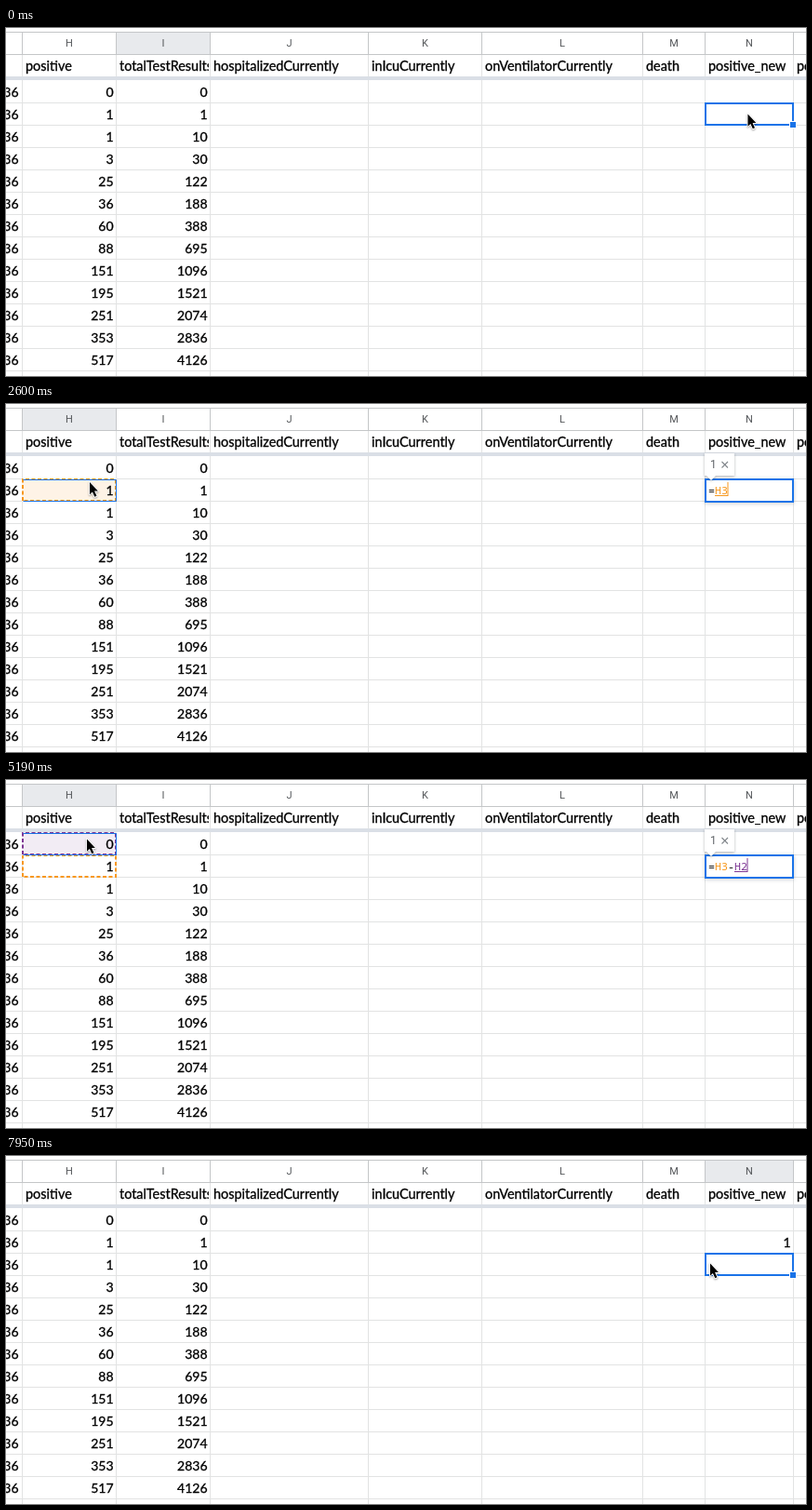
Recreate the animation shown at these times as an HTML page with a canvas. Size 860 px wide and 374 px high, loop 8000 ms.

```html
<!DOCTYPE html>
<html lang="en">
<head>
<meta charset="utf-8">
<title>Spreadsheet formula</title>
<style>
  html, body { margin: 0; width: 100%; height: 100%; overflow: hidden; background: #fff; }
  canvas { display: block; }
</style>
</head>
<body>
<canvas id="stage" width="860" height="374"></canvas>
<script>
const ctx = document.getElementById('stage').getContext('2d');
const W = 860, H = 374, LOOP = 8000, ROW = 24;
const BLUE = '#1a73e8', ORANGE = '#f7981d', PURPLE = '#7e3794', GRID = '#e2e3e3', RULE = '#c4c6c8';
const CELL_FONT = '14.45px Lato, sans-serif';
const DIGIT_FONT = '14px Lato, sans-serif';
const HEAD_FONT = '11px Roboto, sans-serif';
const CODE_FONT = '11.67px "Noto Sans Mono", monospace';
const CHAR = 7, CODE_X = 755;

const rowTop = row => 56 + ROW * (row - 2);

let nextLeft = 17;
const columns = [
  ['H', 'positive', 101], ['I', 'totalTestResults', 101], ['J', 'hospitalizedCurrently', 170],
  ['K', 'inIcuCurrently', 122], ['L', 'onVentilatorCurrently', 173], ['M', 'death', 67],
  ['N', 'positive_new', 95], ['O', 'positive_rate', 120]
].map(([letter, title, width]) => {
  const left = nextLeft;
  nextLeft += width;
  return { letter, title, width, left, right: nextLeft };
});
const [colH, colI] = columns, colN = columns[6];

const cells = {
  H: '0 1 1 3 25 36 60 88 151 195 251 353 517'.split(' '),
  I: '0 1 10 30 122 188 388 695 1096 1521 2074 2836 4126'.split(' ')
};

// Moments at which the formula changes.
const EDIT = 900, HINT = 1080, FIRST = 2600, MINUS = 3950, SECOND = 5190, ENTER = 6470;
const edits = [EDIT, HINT, FIRST, MINUS, SECOND];

// Each glide follows a quadratic curve through a bend, in visible steps.
const glides = [
  { start: 0, end: 1, steps: 1, from: [797, 92.5], bend: [797, 92.5], to: [797, 92.5] },
  { start: 1440, end: 1840, steps: 7, from: [799, 95], bend: [400, 32], to: [89.5, 79.5] },
  { start: 1890, end: 2070, steps: 3, from: [89.5, 81], bend: [89.5, 83], to: [89.5, 84] },
  { start: 4490, end: 4950, steps: 7, from: [89.5, 84], bend: [86, 75], to: [86.5, 63.5] },
  { start: 7310, end: 7530, steps: 4, from: [129.5, 71.5], bend: [370, 140], to: [585, 170] },
  { start: 7770, end: 7950, steps: 3, from: [601, 168], bend: [690, 142], to: [756.5, 115.5] }
];

function cursorAt(t) {
  const g = glides.filter(({ start }) => t >= start).pop();
  const step = Math.round((t - g.start) / (g.end - g.start) * g.steps);
  const p = Math.min(1, step / g.steps), q = 1 - p;
  return g.from.map((a, i) => q * q * a + 2 * q * p * g.bend[i] + p * p * g.to[i]);
}

// Typing hides the pointer until it moves again.
function cursorVisible(t) {
  const moved = glides.filter(({ start }) => t >= start).pop().start;
  return ![EDIT, MINUS].some(typed => t >= typed && moved < typed && t < ENTER);
}

function caretVisible(t) {
  const last = edits.filter(at => t >= at).pop();
  return (t - last) % 1110 < 630;
}

function rect(x, y, w, h, color) {
  ctx.fillStyle = color;
  ctx.fillRect(x, y, w, h);
}

function text(str, x, y, font, color = '#000', align = 'left') {
  ctx.font = font;
  ctx.fillStyle = color;
  ctx.textAlign = align;
  ctx.fillText(str, x, y);
}

// Cell text with slightly heavier strokes.
function cellText(str, x, y, font, align = 'left') {
  text(str, x, y, font, '#000', align);
  ctx.strokeStyle = '#000';
  ctx.lineWidth = 0.3;
  ctx.strokeText(str, x, y);
}

function digits(value, right, row) {
  cellText(value, right - 2.5, rowTop(row) + 18, DIGIT_FONT, 'right');
}

function line(points, color, width, dash = []) {
  ctx.beginPath();
  points.forEach(([x, y]) => ctx.lineTo(x, y));
  ctx.strokeStyle = color;
  ctx.lineWidth = width;
  ctx.setLineDash(dash);
  ctx.stroke();
  ctx.setLineDash([]);
}

function shadowed(color, blur, dy, draw) {
  ctx.save();
  ctx.shadowColor = color;
  ctx.shadowBlur = blur;
  ctx.shadowOffsetY = dy;
  draw();
  ctx.restore();
}

function drawSheet(active) {
  rect(0, 0, W, H, '#fff');
  rect(active.left + 1, 5, active.width - 1, 23, '#e8eaed');
  for (let y = rowTop(3); y < H; y += ROW) rect(0, y, W, 1, GRID);
  for (const { left, right, width, letter, title } of columns) {
    rect(left, 29, 1, H - 29, GRID);
    rect(left, 4, 1, 24, RULE);
    text(letter, (left + right + 1) / 2, 20, HEAD_FONT, '#54575a', 'center');
    ctx.save();
    ctx.beginPath();
    ctx.rect(left + 1, 29, width - 2, 23);
    ctx.clip();
    cellText(title, left + 4, 46, CELL_FONT);
    ctx.restore();
  }
  rect(0, 4, W, 1, RULE);
  rect(0, 28, W, 1, RULE);
  rect(0, 52, W, 4, '#dadfe6');
}

function drawNumbers() {
  cells.H.forEach((value, i) => {
    digits('36', colH.left - 1, i + 2);
    digits(value, colH.right, i + 2);
    digits(cells.I[i], colI.right, i + 2);
  });
}

function drawSelection(row) {
  const y = rowTop(row), { left, right } = colN;
  ctx.strokeStyle = BLUE;
  ctx.lineWidth = 2;
  ctx.strokeRect(left + 1, y + 1, right - left - 1, ROW - 1);
  rect(right - 4, y + 20, 8, 8, '#fff');
  rect(right - 3, y + 21, 6, 6, BLUE);
}

function drawReference(row, color, fill) {
  const left = colH.left + 1, right = colH.right, top = rowTop(row) + 1, bottom = top + ROW - 1;
  const box = [[left, bottom], [left, top], [right, top], [right, bottom], [left, bottom]];
  if (fill) rect(left - 1, top - 1, right - left + 2, bottom - top + 2, fill);
  line(box, color, 2, [4, 2.5]);
  if (fill) line(box.slice(1).map(([x, y]) => [x + 0.5, y + 0.5]), BLUE, 1);
}

function drawEditor(parts, caret, hint) {
  const { left, width } = colN, y = rowTop(3);
  shadowed('rgba(60,64,67,.25)', 4, 1, () => rect(left, y, width + 1, ROW + 2, BLUE));
  rect(left + 2, y + 2, width - 3, ROW - 2, '#fff');
  let x = CODE_X, color = '#000';
  for (const part of parts) {
    const width = part.str.length * CHAR;
    color = part.color || '#000';
    text(part.str, x, 97, CODE_FONT, color);
    if (part.active) rect(x, 98, width, 1, color);
    x += width;
  }
  if (hint) line([[x + 2.5, 95], [x + 2.5, 98.5], [x + 8.5, 98.5], [x + 8.5, 95]], '#c8c8c8', 1);
  if (caret) rect(x - 0.5, 84, 1, 15, color);
}

function drawPreview() {
  shadowed('rgba(60,64,67,.4)', 3, 1, () => {
    ctx.fillStyle = '#fff';
    ctx.beginPath();
    [[751, 53], [783, 53], [783, 77], [763, 77], [758, 82], [753, 77], [751, 77]]
      .forEach(([x, y]) => ctx.lineTo(x, y));
    ctx.fill();
  });
  text('1', 757, 69, '12px Roboto, sans-serif', '#5f6368');
  line([[769.5, 62], [776, 68.5]], '#80868b', 1.1);
  line([[776, 62], [769.5, 68.5]], '#80868b', 1.1);
}

function drawFormula(t) {
  const first = t >= FIRST, minus = t >= MINUS, second = t >= SECOND;
  const parts = [{ str: '=' }];
  if (first) parts.push({ str: 'H3', color: ORANGE, active: !minus });
  if (minus) parts.push({ str: '-' });
  if (second) parts.push({ str: 'H2', color: PURPLE, active: true });
  const pickingFirst = t >= HINT && !first, pickingSecond = t >= MINUS + 60 && !second;
  drawEditor(parts, caretVisible(t), pickingFirst || pickingSecond);
  if (first && !minus || second) drawPreview();
}

function drawCursor([x, y]) {
  ctx.save();
  ctx.translate(x, y);
  ctx.scale(0.94, 0.94);
  const arrow = new Path2D('M.5 0V14L3.6 11.1L6.2 16.8L8.5 15.8L5.9 10.2H10Z');
  ctx.lineJoin = 'round';
  ctx.lineWidth = 2;
  ctx.strokeStyle = '#fff';
  shadowed('rgba(0,0,0,.35)', 2, 1, () => ctx.stroke(arrow));
  ctx.fillStyle = '#000';
  ctx.fill(arrow);
  ctx.restore();
}

function draw(t) {
  const done = t >= ENTER, editing = t >= EDIT && !done;
  drawSheet(done ? colN : t >= FIRST ? colH : colI);
  if (editing && t >= FIRST) drawReference(3, ORANGE, t < MINUS && '#fef3e6');
  if (editing && t >= SECOND) drawReference(2, PURPLE, '#f2ecf4');
  drawNumbers();
  if (done) digits('1', colN.right, 3);
  if (editing) drawFormula(t);
  else drawSelection(done ? 4 : 3);
  if (cursorVisible(t)) drawCursor(cursorAt(t));
}

const began = performance.now();
function tick() {
  draw((performance.now() - began) % LOOP);
  requestAnimationFrame(tick);
}
tick();
</script>
</body>
</html>
```
